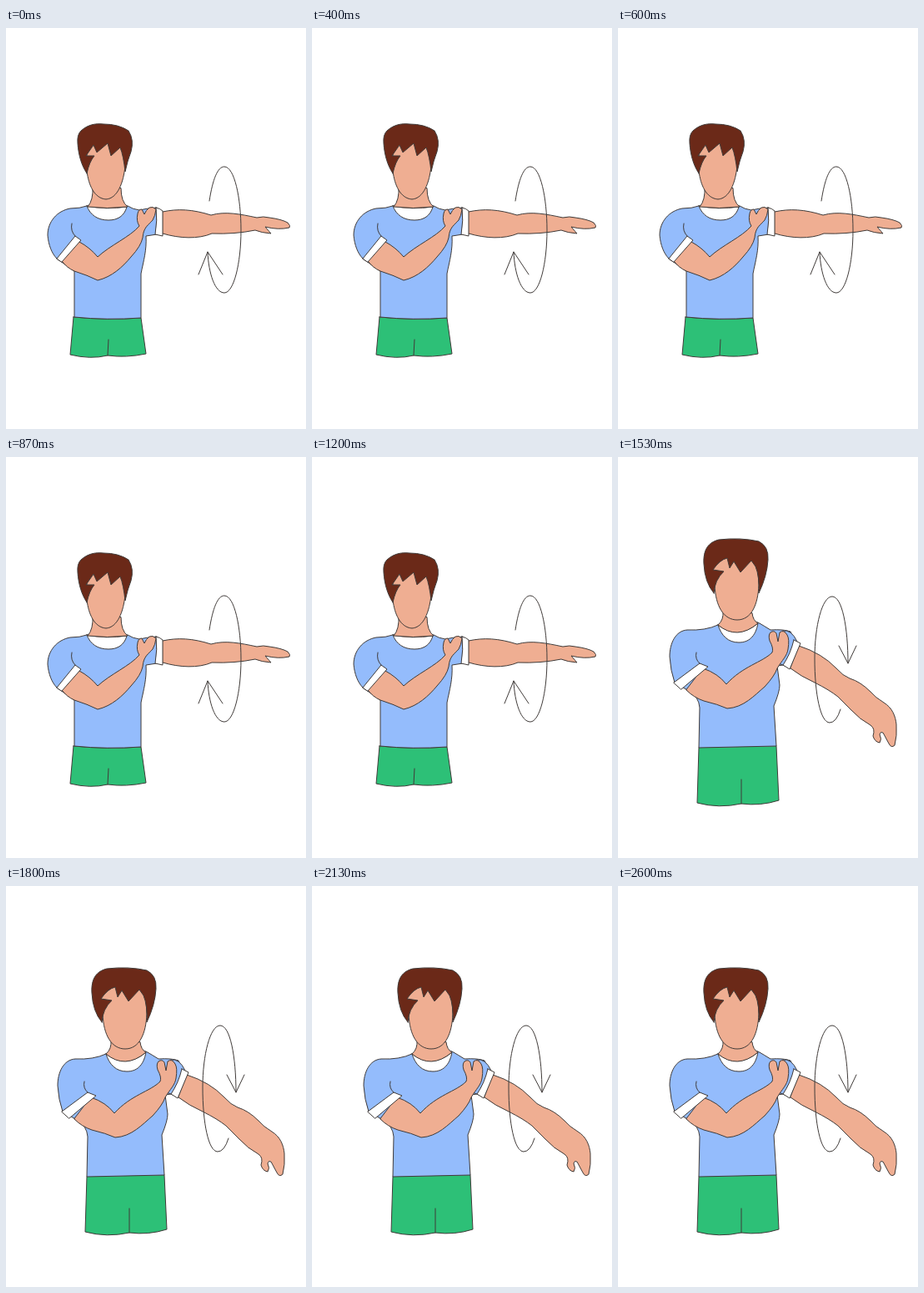
Write an HTML page that moves like this. It is 360 by 480 pixels and loops after 3.07 s.

```html
<!DOCTYPE html>
<html lang="en">
<head>
<meta charset="utf-8">
<title>Shoulder rotation</title>
<style>
  html, body { margin: 0; width: 100%; height: 100%; overflow: hidden; background: #fff; }
  svg { display: block; width: 100vw; height: 100vh; }
  path { fill: none; stroke: #403b39; stroke-width: 1; stroke-linejoin: round; stroke-linecap: round; }
  .skin { fill: #efae92; }
  .hair { fill: #6b2918; }
  .shirt { fill: #94bcfc; }
  .white { fill: #fff; }
  .shorts { fill: #2dc077; }
</style>
</head>
<body>
<svg viewBox="0 0 360 480">
  <g id="level">
    <path class="shorts" d="M81 346L77 391Q101 397 122 392Q144 395 168 390L162 347Q121 350 81 346Z"/>
    <path d="M123 373L122 392"/>
    <path class="shirt" d="M97 213Q89 216 77 216C61 219 50 232 50 248C51 260 55 270 61 276L82 291V346Q121 350 162 347L162 294C165 279 169 266 168 249L181 247V215Q168 216 160 218Q152 217 146 213Z"/>
    <path class="white" d="M97 213Q120 218 145 214C142 225 134 230 123 230C110 230 101 224 97 213Z"/>
    <path class="skin" d="M104 190Q105 206 98 214Q121 217 146 214Q138 208 138 192Z"/>
    <path class="skin" d="M188 220C206 216 224 217 246 224C263 219 282 223 301 227Q309 225 316 227Q331 229 338 233Q342 237 340 239Q327 242 311 238L318 246Q306 245 299 242Q275 247 247 246C231 253 208 252 188 246Z"/>
    <path class="white" d="M180 215Q185 216 188 219V249L179 247Q182 230 180 215Z"/>
    <path class="skin" d="M67 279Q73 287 82 291Q98 296 110 302C127 298 140 286 150 274Q162 261 164 251C165 238 171 236 176 230Q179 225 180 217Q176 213 172 215Q168 218 166 223L163 217Q159 217 158 222Q156 231 160 237C149 250 125 260 110 274Q101 263 88 256Z"/>
    <path class="white" d="M61 276L83 249L90 254L67 280Z"/>
    <path d="M83 249Q77 243 79 234"/>
    <path class="skin" d="M97 140V171C99 188 106 204 120 205C134 204 141 185 143 165L147 138L122 126Z"/>
    <path class="hair" d="M97 174C91 165 87 153 86 138Q85 128 90 123C98 116 106 114 117 115Q135 115 147 123Q154 134 150 148Q146 158 143 172Q141 153 137 143L126 153L122 138L109 149L105 140L96 153L106 153Q100 160 97 174Z"/>
    <path d="M244 207C248 181 254 166 262 166C274 166 282 203 282 242C282 283 273 317 262 317C251 317 243 294 242 268M231 295L242 268L260 295"/>
  </g>
  <g id="lowered">
    <path class="shorts" d="M97 348L95 414Q121 421 148 415Q171 418 193 411L190 346Z"/>
    <path d="M148 386V415"/>
    <path class="shirt" d="M120 201Q105 208 83 207C69 208 62 223 62 239Q63 256 68 270L85 280Q97 287 98 300L97 348L190 346L187 298Q194 281 194 273L191 250L198 249L212 219L207 209Q199 206 183 207Q175 202 168 198Z"/>
    <path class="white" d="M120 201Q144 219 168 199C165 215 157 222 145 222C132 222 124 214 120 201Z"/>
    <path class="skin" d="M126 185Q127 195 120 201Q143 220 168 199Q162 196 161 187Z"/>
    <path class="skin" d="M217 226Q245 235 262 253Q270 262 278 265Q291 269 303 281Q309 288 319 294C329 300 333 310 334 320Q335 334 332 345Q328 349 325 343L318 330Q315 328 314 332Q317 338 314 342Q308 341 306 334Q309 325 303 321Q290 314 280 303Q272 295 264 287Q254 279 236 270Q220 263 207 253Z"/>
    <path class="shirt" d="M198 208Q208 206 215 221L203 251L190 246Z"/>
    <path class="white" d="M211 219L219 223L206 254L198 249Q207 236 211 219Z"/>
    <path class="skin" d="M82 279Q91 288 103 292Q120 296 131 301C151 300 164 285 176 275Q188 262 191 253C197 243 203 238 204 230Q206 218 203 213Q199 206 194 210L192 221L190 211Q187 207 183 210Q180 213 182 220Q187 229 185 234C173 246 150 250 130 272Q120 259 102 253Z"/>
    <path class="white" d="M67 270L98 247L108 251L76 278Z"/>
    <path d="M98 247Q92 242 94 234"/>
    <path class="skin" d="M113 134L116 153C117 179 127 195 143 195C160 195 168 177 169 153L167 122L131 118Z"/>
    <path class="hair" d="M115 163Q104 150 103 128C102 110 109 102 121 99Q147 96 169 101Q181 107 180 123Q179 142 169 163Q170 143 165 131L160 124L147 138L139 125L134 133L131 121Q122 123 114 135L127 137Q116 147 115 163Z"/>
    <path d="M276 247C276 204 269 167 257 167C245 167 236 202 236 241C236 284 243 318 254 318Q262 318 267 302M265 226L276 247L286 226"/>
  </g>
</svg>
<script>
  const LOOP = 3070, SWITCH = 1530;
  const level = document.getElementById("level");
  const lowered = document.getElementById("lowered");
  const start = performance.now();

  function draw() {
    const isLevel = (performance.now() - start) % LOOP < SWITCH;
    level.style.display = isLevel ? "" : "none";
    lowered.style.display = isLevel ? "none" : "";
    requestAnimationFrame(draw);
  }
  draw();
</script>
</body>
</html>
```
